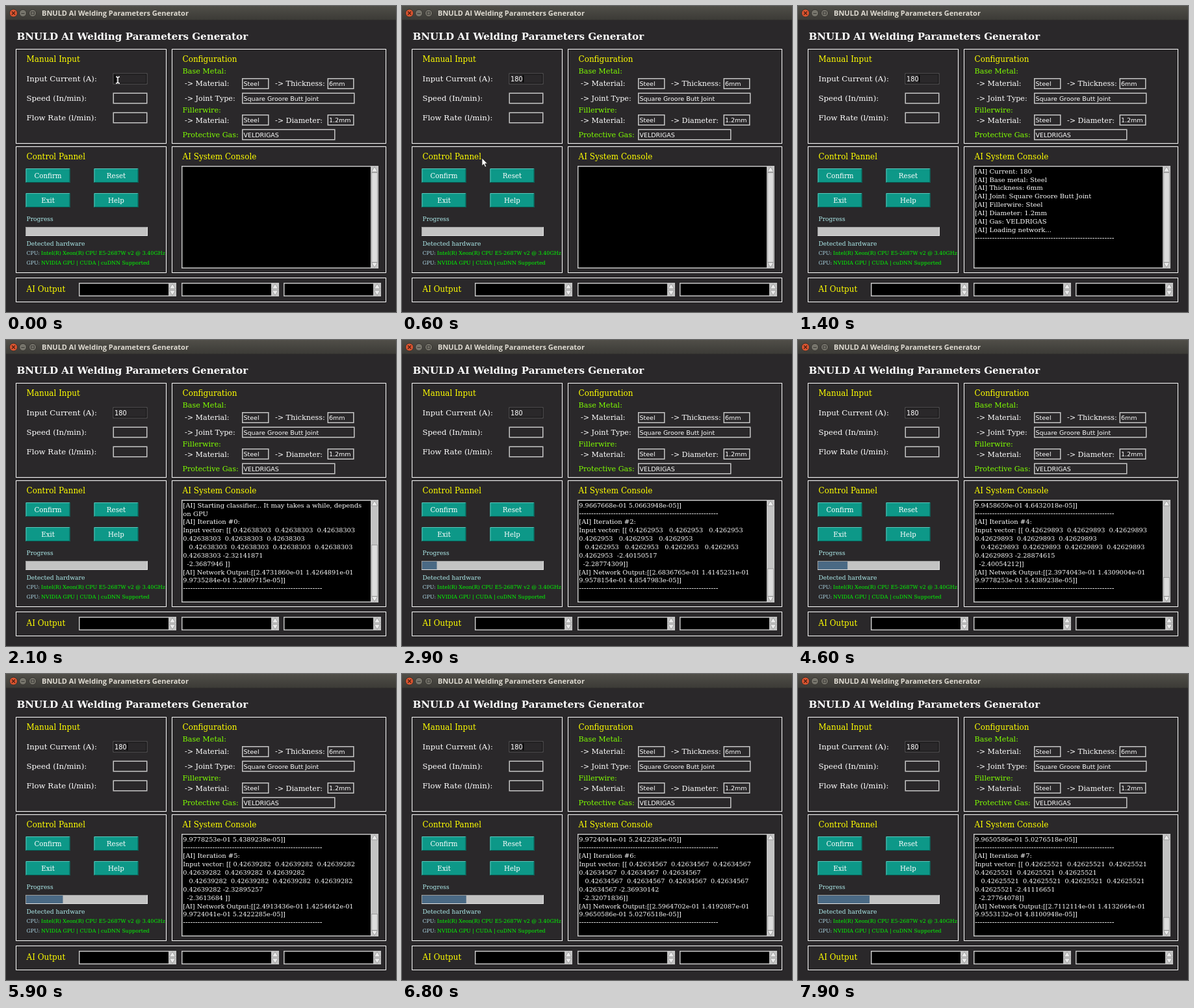
These frames come from a looping animation (600 by 471 pixels, 8 s). An HTML page:

```html
<!DOCTYPE html>
<html lang="en">
<head>
<meta charset="utf-8">
<title>Welding Parameters Generator</title>
<style>
  html, body { margin: 0; width: 100%; height: 100%; overflow: hidden; background: #2a282a; }
  svg { display: block; width: 600px; height: 471px; }
  text { white-space: pre; }
  .serif { font-family: "DejaVu Serif", "Noto Serif", serif; }
  .sans { font-family: "DejaVu Sans", sans-serif; }
  .bar { font-family: "Open Sans", "Noto Sans", sans-serif; font-weight: 700; }
</style>
</head>
<body>
<svg id="stage" viewBox="0 0 600 471" xmlns="http://www.w3.org/2000/svg">
  <defs>
    <linearGradient id="chrome" x2="0" y2="1">
      <stop offset="0" stop-color="#504e48"/>
      <stop offset="1" stop-color="#3b3a36"/>
    </linearGradient>
  </defs>
</svg>
<script>
const LOOP = 8000, STEP = 100;
const WHITE = '#fff', YELLOW = '#ffff00', GREEN = '#7fff00', LIME = '#00ff00',
      PALE = '#afeeee', BG = '#2a282a', GREY = '#c6c6c6';
const stage = document.getElementById('stage');

function add(tag, attrs, parent = stage) {
  const el = document.createElementNS('http://www.w3.org/2000/svg', tag);
  for (const name in attrs) el.setAttribute(name, attrs[name]);
  parent.append(el);
  return el;
}

const rect = (x, y, width, height, fill, extra = {}) =>
  add('rect', { x, y, width, height, fill, ...extra });

const path = (d, stroke, width = 1, fill = 'none') =>
  add('path', { d, stroke, 'stroke-width': width, fill });

// Keeps the digit width steady if another serif face is used
const pen = document.createElement('canvas').getContext('2d');
pen.font = '1000px "DejaVu Serif", "Noto Serif", serif';
const serifScale = 636 / pen.measureText('0').width;

function label(text, x, y, size, fill = WHITE, kind = 'serif', extra = {}) {
  const fontSize = kind === 'serif' ? size * serifScale : size;
  const el = add('text', { x, y, fill, class: kind, 'font-size': fontSize, ...extra });
  el.textContent = text;
  return el;
}

const heading = (text, x, y) => label(text, x, y, 12, YELLOW);

function bevel(x, y, w, h, fill, light, dark) {
  rect(x, y, w, h, fill);
  path(`M${x + .5} ${y + h - .5}V${y + .5}H${x + w - .5}`, light);
  path(`M${x + .5} ${y + h - .5}H${x + w - .5}V${y + .5}`, dark);
}

function panel(x, y, w, h) {
  rect(x + .5, y + .5, w - 1, h - 1, 'none', { stroke: WHITE });
}

function entry(x, y, w, text = '') {
  rect(x + .75, y + .75, w - 1.5, 15.5, BG, { stroke: GREY, 'stroke-width': 1.5 });
  label(text, x + 2.5, y + 12, 9.5, WHITE, 'sans');
}

function button(text, x, y) {
  bevel(x, y, 68, 22, '#0d9888', '#58c8bc', '#075a51');
  label(text, x + 34, y + 15, 10.3, WHITE, 'serif', { 'text-anchor': 'middle' });
}

function arrow(x, y, dir) {
  const tip = y - 4 * dir, base = y + 3.6 * dir;
  path(`M${x} ${tip}L${x + 4.6} ${base}H${x - 4.6}Z`, '#8a8a8a', .7, '#ececec');
}

function textBox(x, y, w, h) {
  rect(x, y, w, h, GREY);
  rect(x + 1.5, y + 1.5, w - 13.5, h - 3, '#000');
  rect(x + w - 11.5, y + 1, 10.5, h - 2, '#c3c3c3');
  arrow(x + w - 6, y + 5.5, 1);
  arrow(x + w - 6, y + h - 5.5, -1);
}

// Window frame
rect(0, 0, 600, 471, BG);
rect(0, 0, 600, 22, 'url(#chrome)');
rect(0, 21, 600, 1, '#302f2c');
add('circle', { cx: 11.5, cy: 11, r: 6, fill: '#dc5530', stroke: '#33312d' });
path('M9 8.5L14 13.5M14 8.5L9 13.5', '#4a2015', 1.3);
for (const cx of [26, 41]) add('circle', { cx, cy: 11, r: 5.5, fill: '#77756c', stroke: '#33312d' });
path('M23.5 11.5H28.5M38.7 9H43.3V13H38.7Z', '#3a3935', 1.1);
label('BNULD AI Welding Parameters Generator', 55, 15, 11, '#dfdbd2', 'bar');
label('BNULD AI Welding Parameters Generator', 16.5, 52, 15.15, WHITE, 'serif', { 'font-weight': 700 });

panel(15, 66, 232, 146);
panel(255, 66, 330, 146);
panel(15, 216, 232, 195);
panel(255, 216, 330, 195);
panel(15, 418, 570, 38);

// Manual input
heading('Manual Input', 31.5, 86);
['Input Current (A):', 'Speed (In/min):', 'Flow Rate (l/min):'].forEach((text, i) => {
  label(text, 31.5, 116 + 30 * i, 11.8);
  if (i) entry(164.5, 103.5 + 30 * i, 53);
});
rect(165, 104, 52, 16, BG, { stroke: '#626062' });
rect(166, 105, 50, 14, 'none', { stroke: '#111' });
const current = label('', 167, 115.5, 9.8, WHITE, 'sans');
const caret = rect(0, 106.5, 1.8, 11, '#000');

// Configuration
heading('Configuration', 271.5, 86);
label('Base Metal:', 271.5, 104.3, 11.2, GREEN);
label('Fillerwire:', 271.5, 164.3, 11.2, GREEN);
label('Protective Gas:', 271.5, 202, 11.15, GREEN);
[['Material:', 275, 123], ['Thickness:', 414, 123], ['Joint Type:', 275, 146],
 ['Material:', 275, 179.5], ['Diameter:', 414, 179.5]]
  .forEach(([text, x, y]) => label('-> ' + text, x, y, 11.15));
entry(363, 111, 41.5, 'Steel');
entry(494.5, 111, 41, '6mm');
entry(363, 133.5, 173.5, 'Square Groore Butt Joint');
entry(363, 167, 41.5, 'Steel');
entry(494.5, 167, 41, '1.2mm');
entry(363, 189.5, 143.5, 'VELDRIGAS');

// Controls
heading('Control Pannel', 31.5, 236);
button('Confirm', 30.5, 250);
button('Reset', 135.5, 250);
button('Exit', 30.5, 288);
button('Help', 135.5, 288);
label('Progress', 31.5, 331, 9.2, PALE);
bevel(30, 340, 188, 14, '#c3c3c3', '#9b9b9b', '#e4e4e4');
const progress = rect(31, 341, 0, 12, '#4a6984');
label('Detected hardware', 31.5, 369, 9.2, PALE);
label('CPU:', 31.5, 382.5, 7.95, '#add8e6');
label('Intel(R) Xeon(R) CPU E5-2687W v2 @ 3.40GHz', 54, 382.5, 7.95, LIME);
label('GPU:', 31.5, 397.5, 7.95, '#add8e6');
label('NVIDIA GPU | CUDA | cuDNN Supported', 54, 397.5, 7.95, LIME);

// Console and outputs
heading('AI System Console', 271.5, 236);
textBox(270, 246, 303, 158);
const thumb = rect(562.5, 256.5, 9, 138, '#dcdcdc', { stroke: '#8f8f8f', 'stroke-width': .8 });
const ROWS = 12;
const rows = Array.from({ length: ROWS }, (_, i) => label('', 272.3, 257.7 + 12.85 * i, 10));
heading('AI Output', 31.5, 440);
textBox(112, 426, 150, 21);
textBox(270, 426, 150, 21);
textBox(427, 426, 150, 21);

// Console log: each block is printed whole at its time
const RULE = '-'.repeat(57);
const setup = ['[AI] Current: 180', '[AI] Base metal: Steel', '[AI] Thickness: 6mm',
  '[AI] Joint: Square Groore Butt Joint', '[AI] Fillerwire: Steel', '[AI] Diameter: 1.2mm',
  '[AI] Gas: VELDRIGAS', '[AI] Loading network...', RULE];
const starting = ['[AI] Starting classifier... It may takes a while, depends', 'on GPU'];
const runs = [
  [1900, '0.42638303', '-2.32141871', '-2.3687946', '2.4731860', '1.4264891', '9.9735284', '5.2809715'],
  [2300, '0.42636198', '-2.36193427', '-2.32830195', '2.5766131', '1.4203176', '9.9667668', '5.0663948'],
  [2800, '0.4262953', '-2.40150517', '-2.28774309', '2.6836765', '1.4145231', '9.9578154', '4.8547983'],
  [3600, '0.42618304', '-2.44437206', '-2.24310518', '2.8041527', '1.4080314', '9.9458659', '4.6432018'],
  [4500, '0.42629893', '-2.28874615', '-2.40054212', '2.3974043', '1.4309004', '9.9778253', '5.4389238'],
  [5400, '0.42639282', '-2.32895257', '-2.3613684', '2.4913436', '1.4254642', '9.9724041', '5.2422285'],
  [6400, '0.42634567', '-2.36930142', '-2.32071836', '2.5964702', '1.4192087', '9.9650586', '5.0276518'],
  [7300, '0.42625521', '-2.41116651', '-2.27764078', '2.7112114', '1.4132664', '9.9553132', '4.8100948'],
];

function report([, value, a, b, o1, o2, o3, o4], n) {
  const v = value.padEnd(10);
  const list = count => Array(count).fill(v).join('  ');
  return [`[AI] Iteration #${n}:`, 'Input vector: [[ ' + list(3), list(3), '   ' + list(4),
    `${v} ${a}`, `  ${b.padEnd(11)}]]`, `[AI] Network Output:[[${o1}e-01 ${o2}e-01`,
    `${o3}e-01 ${o4}e-05]]`, RULE];
}

const log = [[1200, setup], [1500, starting], ...runs.map((run, n) => [run[0], report(run, n)])];

// Rules, number rows and prose have slightly different sizes
const lineSize = text => text === RULE ? 11.15 : /\d\.\d{3}/.test(text) ? 9.68 : 10;

// Pointer shapes and path
const beam = path('M-3 -5Q0 -5 0 -3Q0 -5 3 -5M0 -4V4M-3 5Q0 5 0 3Q0 5 3 5', '#fff', 1.5);
const pointer = path('M0 0V12L2.8 9.5L4.8 14L6.8 13L4.8 8.8H8.5Z', '#222', .8, '#fff');
const trail = [[0, 172, 114], [300, 172, 114], [600, 123, 234], [900, 70, 260], [1400, 70, 260]];

function along(t) {
  const i = trail.findIndex(point => point[0] > t);
  const [t0, x0, y0] = trail[i - 1], [t1, x1, y1] = trail[i];
  const p = (t - t0) / (t1 - t0);
  return [x0 + (x1 - x0) * p, y0 + (y1 - y0) * p];
}

const show = (el, on) => el.setAttribute('visibility', on ? 'visible' : 'hidden');

function draw(t) {
  const typed = Math.min(3, t / STEP);
  current.textContent = '180'.slice(0, typed);
  caret.setAttribute('x', 167 + typed * 6.2);
  show(caret, (t + 550) % 900 < 600);

  const moving = t < 1400;
  show(beam, t < 400);
  show(pointer, moving && t >= 400);
  if (moving) {
    const place = `translate(${along(t)})`;
    beam.setAttribute('transform', place);
    pointer.setAttribute('transform', place);
  }

  const lines = log.filter(([at]) => at <= t).flatMap(([, block]) => block);
  const total = Math.max(ROWS, lines.length + 1);
  const top = total - ROWS;
  rows.forEach((row, i) => {
    const text = lines[top + i] || '';
    row.textContent = text;
    row.setAttribute('font-size', lineSize(text) * serifScale);
  });
  thumb.setAttribute('y', 256.5 + 138 * top / total);
  thumb.setAttribute('height', 138 * ROWS / total);

  const done = runs.filter(([at]) => at <= t).length - 1;
  progress.setAttribute('width', Math.max(0, done) * 11.3);
}

const start = performance.now();
function tick() {
  const t = (performance.now() - start) % LOOP;
  draw(Math.floor(t / STEP) * STEP);
  requestAnimationFrame(tick);
}
tick();
</script>
</body>
</html>
```
